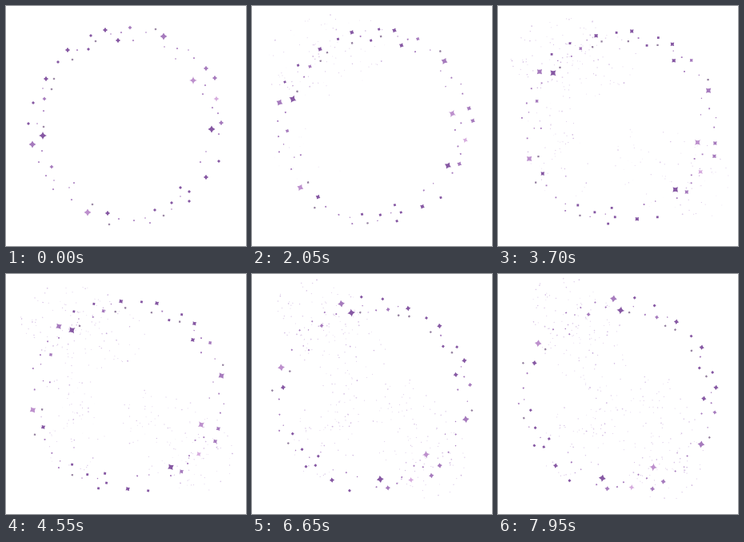
These frames come from a looping animation (300x300 px, 8 s). An HTML page with a canvas:

```html
<!DOCTYPE html>
<html>
<head>
<meta charset="utf-8">
<style>
  html, body { margin: 0; width: 100%; height: 100%; overflow: hidden; background: #fff; }
  canvas { display: block; }
</style>
</head>
<body>
<canvas id="stage" width="300" height="300"></canvas>
<script>
const ctx = document.getElementById('stage').getContext('2d');
const LOOP = 8000, STEP = 50;
const SPIN = 12.38 * Math.PI / 180; // radians per second

const DARK = '#8658a3', MID = '#a67bbd', LIGHT = '#bd90cd', PINK = '#d6acde', GREY = '#94809f';

// Ring stars at time zero, grouped by radius, waist (0 = sharp, 0.5 = diamond) and colour.
const ring = [
  { r: 5, waist: 0.2, color: DARK, at: [[46,162]] },
  { r: 4.5, waist: 0.24, color: DARK, at: [[257,154]] },
  { r: 4.4, waist: 0.24, color: MID, at: [[197,38], [33,173]] },
  { r: 4.4, waist: 0.24, color: LIGHT, at: [[102,258]] },
  { r: 5, waist: 0.14, color: LIGHT, at: [[234,93]] },
  { r: 3.7, waist: 0.16, color: PINK, at: [[263,116]] },
  { r: 3.2, waist: 0.3, color: DARK, at: [[127,259], [250,214], [77,55], [124,30], [50,91], [140,43]] },
  { r: 3.2, waist: 0.3, color: MID, at: [[250,78], [261,90], [269,146]] },
  { r: 2.6, waist: 0.35, color: MID, at: [[57,201], [48,116], [155,27]] },
  { r: 2, waist: 0.5, color: DARK, at: [
    [34,121], [65,70], [28,147], [103,54], [106,37], [186,255], [207,246],
    [218,227], [229,232], [229,244], [266,194]] },
  { r: 1.6, waist: 0.5, color: GREY, at: [
    [112,44], [83,67], [60,91], [57,104], [47,151], [108,248], [129,273], [197,262], [187,29]] },
  { r: 1.3, waist: 0.5, color: MID, at: [
    [89,55], [47,131], [45,181], [41,195], [50,212], [59,229], [85,221], [82,242],
    [141,266], [160,268], [180,271], [243,195], [266,160], [265,134], [258,127],
    [246,110], [249,99], [235,65], [214,53], [159,43], [144,33]] },
  { r: 0.9, waist: 0.5, color: MID, at: [
    [46,103], [39,147], [60,218], [79,227], [174,265], [207,254], [218,238], [250,182],
    [212,66], [228,55], [198,51], [175,33], [131,35]] }
];

// Dust clouds turn about their own slowly drifting centres.
const clouds = [
  { count: 125, x: 95, y: 65, dx: 1.6, dy: 2, a: 80, b: 50, tilt: 0.09, from: 0.2, to: 3.1 },
  { count: 75, x: 77, y: 180, dx: 7.5, dy: 4, a: 68, b: 42, tilt: 1.4, from: 1.4, to: 4.6 },
  { count: 115, x: 217, y: 207, dx: -3.2, dy: -0.5, a: 80, b: 54, tilt: 0.5, from: 2.1, to: 4.3 }
];

let seed = 41;
function random() {
  seed = (seed * 1664525 + 1013904223) % 4294967296;
  return seed / 4294967296;
}

for (const cloud of clouds) {
  cloud.specks = Array.from({ length: cloud.count }, () => {
    const angle = random() * 2 * Math.PI, reach = Math.pow(random(), 0.65);
    return {
      x: cloud.a * reach * Math.cos(angle),
      y: cloud.b * reach * Math.sin(angle),
      size: 0.8 + 0.8 * random() ** 3,
      alpha: 0.35 + 0.4 * random(),
      birth: cloud.from + (cloud.to - cloud.from) * random()
    };
  });
}

function star(x, y, r, waist) {
  const c = r * waist;
  ctx.moveTo(x, y - r);
  ctx.quadraticCurveTo(x + c, y - c, x + r, y);
  ctx.quadraticCurveTo(x + c, y + c, x, y + r);
  ctx.quadraticCurveTo(x - c, y + c, x - r, y);
  ctx.quadraticCurveTo(x - c, y - c, x, y - r);
}

function drawRing(t) {
  ctx.save();
  ctx.translate(150, 150);
  ctx.rotate(SPIN * t);
  ctx.translate(-150, -150);
  for (const { r, waist, color, at } of ring) {
    ctx.fillStyle = color;
    ctx.beginPath();
    for (const [x, y] of at) star(x, y, r, waist);
    ctx.fill();
  }
  ctx.restore();
}

function drawCloud(cloud, t) {
  const age = t - 3.7;
  ctx.save();
  ctx.translate(cloud.x + cloud.dx * age, cloud.y + cloud.dy * age);
  ctx.rotate(cloud.tilt + SPIN * age);
  ctx.fillStyle = '#b793cf';
  for (const { x, y, size, alpha, birth } of cloud.specks) {
    ctx.globalAlpha = alpha * Math.min(1, Math.max(0, t - birth));
    ctx.fillRect(x - size / 2, y - size / 2, size, size);
  }
  ctx.restore();
}

function frame() {
  const t = Math.floor(performance.now() % LOOP / STEP) * STEP / 1000;
  ctx.clearRect(0, 0, 300, 300);
  for (const cloud of clouds) drawCloud(cloud, t);
  drawRing(t);
  requestAnimationFrame(frame);
}
frame();
</script>
</body>
</html>
```
